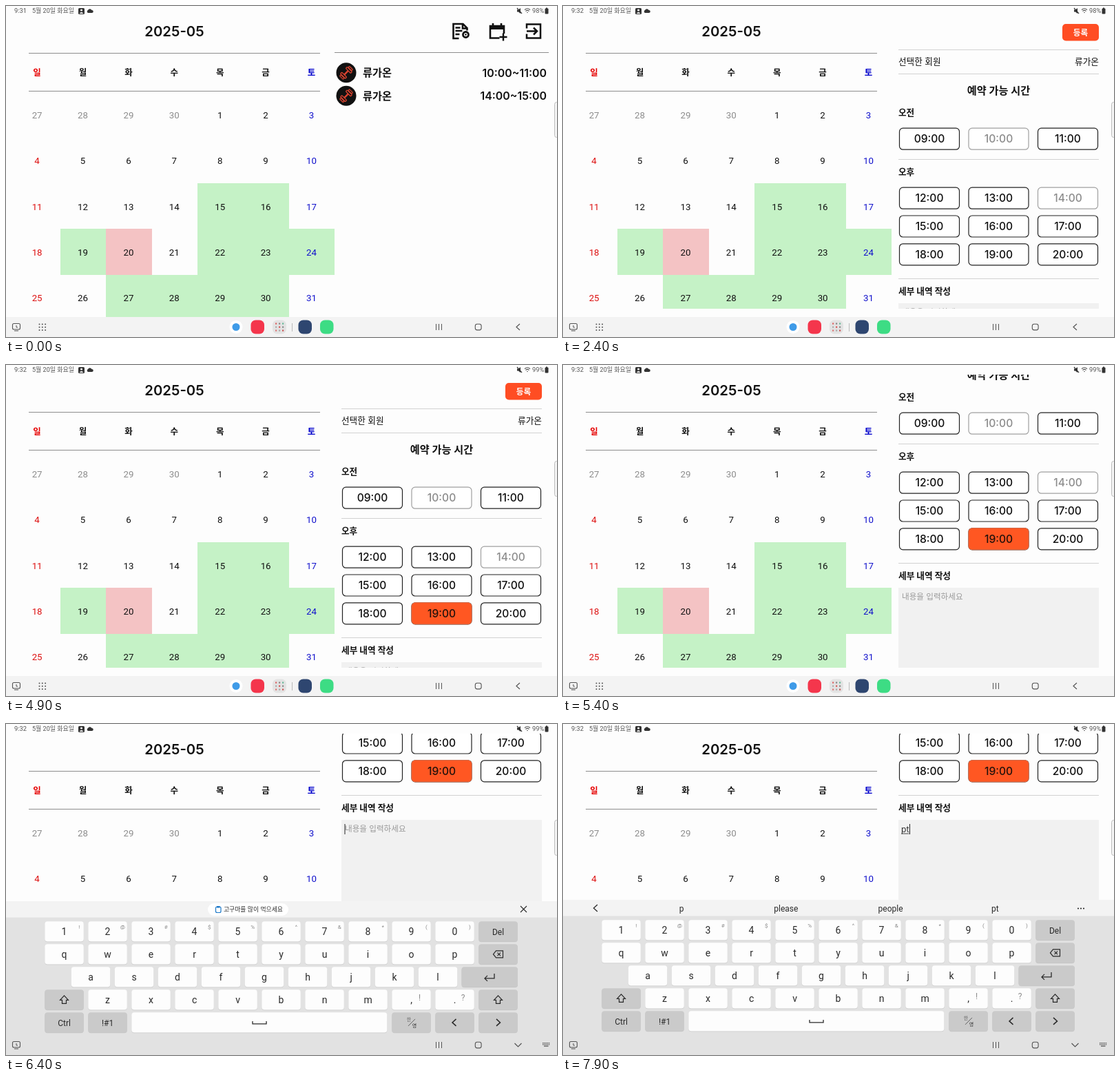
An HTML page with a canvas that plays this animation: 800x480 px, repeating every 8 s.

```html
<!DOCTYPE html>
<html lang="ko">
<head>
<meta charset="utf-8">
<title>Booking calendar</title>
<style>
html, body { margin: 0; width: 100%; height: 100%; overflow: hidden; background: #fdfdfd; }
canvas { display: block; width: 800px; height: 480px; }
</style>
</head>
<body>
<canvas id="stage" width="800" height="480"></canvas>
<script>
const ctx = document.getElementById('stage').getContext('2d');
const LOOP = 8000, STEP = 100;
const SANS = 'Inter, "Noto Sans CJK KR", "Noto Sans CJK JP", sans-serif';
const ROBOTO = 'Roboto, "Noto Sans CJK KR", "Noto Sans CJK JP", sans-serif';
const MEMBER = '류가온', OTHER = '문다솔';
const INK = '#111', ORANGE = '#ff5722', PAGE = '#fdfdfd';
const BOOKED = [15, 16, 19, 22, 23, 24, 27, 28, 29, 30];

const clamp = v => Math.max(0, Math.min(1, v));

// y is the vertical middle of the capitals
function text(s, x, y, size, { color = INK, weight = 400, align = 'left', font = SANS } = {}) {
  ctx.font = `${weight} ${size}px ${font}`;
  ctx.fillStyle = color;
  ctx.textAlign = align;
  ctx.fillText(s, x, y + size * 0.362);
}

function rect(x, y, w, h, color) {
  ctx.fillStyle = color;
  ctx.fillRect(x, y, w, h);
}

function box(x, y, w, h, r, fill, stroke, line = 1) {
  ctx.beginPath();
  ctx.roundRect(x, y, w, h, r);
  paint(fill, stroke, line);
}

function disc(x, y, r, fill, stroke, line = 1) {
  ctx.beginPath();
  ctx.arc(x, y, r, 0, Math.PI * 2);
  paint(fill, stroke, line);
}

function paint(fill, stroke, line) {
  if (fill) { ctx.fillStyle = fill; ctx.fill(); }
  if (stroke) { ctx.strokeStyle = stroke; ctx.lineWidth = line; ctx.stroke(); }
}

function path(d, x, y, color, line = 1, fill = false) {
  ctx.save();
  ctx.translate(x, y);
  const p = new Path2D(d);
  if (fill) {
    ctx.fillStyle = color;
    ctx.fill(p);
  } else {
    ctx.strokeStyle = color;
    ctx.lineWidth = line;
    ctx.stroke(p);
  }
  ctx.restore();
}

function clipped(x, y, w, h, draw) {
  ctx.save();
  ctx.beginPath();
  ctx.rect(x, y, w, h);
  ctx.clip();
  draw();
  ctx.restore();
}

function statusBar(t) {
  const gray = '#555';
  const style = { color: gray, font: ROBOTO };
  text(t < 2400 ? '9:31' : '9:32', 12, 7, 9.3, style);
  text('5월 20일 화요일', 38, 7, 9, style);
  box(105, 3, 9, 9, 1.5, '#333');
  disc(109.5, 6, 1.5, '#fff');
  path('M-3 3Q0-1 3 3Z', 109.5, 8, '#fff', 1, true);
  path('M-3 3A2.2 2.2 0 0 1-3-1A3 3 0 0 1 2.5-1A2 2 0 0 1 3 3Z', 122, 7, '#333', 1, true);
  path('M-3-1.5H-1L2-4V4L-1 1.5H-3Z', 745, 7, '#333', 1, true);
  path('M-3-4L4 4', 745, 7, '#333', 1.2);
  path('M-4-1.5Q0-5 4-1.5M-2.5.5Q0-1.7 2.5.5M-.8 2.5H.8', 757, 7, gray, 1.1);
  text(t < 4300 ? '98%' : '99%', 764, 7, 9.3, style);
  box(782.5, 3.5, 5, 8, 1, '#333');
  rect(784, 2.5, 2, 1.5, '#333');
}

function calendar(booked, bottom) {
  const CELL = 66.4;
  const edgeX = c => Math.round(12.3 + CELL * c);
  const edgeY = r => Math.round(124.2 + CELL * r);
  const midX = c => 45.1 + CELL * c;
  text('2025-05', 244.5, 37, 20.3, { weight: 600, align: 'center' });
  rect(33, 68, 423, 1, '#8d8d8d');
  rect(33, 123, 423, 1, '#8d8d8d');
  [...'일월화수목금토'].forEach((d, c) => {
    const color = c === 0 ? '#e60000' : c === 6 ? '#0000cc' : INK;
    text(d, midX(c), 96, 12.5, { color, weight: 700, align: 'center' });
  });
  clipped(0, 124, 478, bottom - 124, () => {
    for (let i = 0; i < 35; i++) {
      const c = i % 7, r = Math.floor(i / 7), day = i - 3;
      const x = edgeX(c), y = edgeY(r);
      const fill = day === 20 ? '#f4c3c4' : booked && BOOKED.includes(day) ? '#c5f2c6' : null;
      if (fill) rect(x, y, edgeX(c + 1) - x, edgeY(r + 1) - y, fill);
      const color = day < 1 ? '#8c8c8c' : c === 0 ? '#dd1111' : c === 6 ? '#1111cc' : INK;
      const label = day < 1 ? day + 30 : day;
      text(label, midX(c), 158 + CELL * r, 13.3, { color, align: 'center', font: ROBOTO });
    }
  });
}

function dumbbell(x, y) {
  disc(x, y, 14.5, '#111');
  ctx.save();
  ctx.translate(x, y);
  ctx.rotate(-Math.PI / 4);
  rect(-4, -1.2, 8, 2.4, '#d9432f');
  for (const s of [-1, 1]) {
    box(s * 5.5 - 1.5, -5, 3, 10, 1, null, '#d9432f', 1.3);
    box(s * 8.8 - 1.2, -3.5, 2.4, 7, 1, null, '#d9432f', 1.2);
  }
  ctx.restore();
}

function bookingList() {
  path('M-2 10.5H-10V-10.5H4L10-4.5V-1M3.5-10.5V-4H10M-7-5H0M-7-.5H3M-7 4.5H-1', 659.5, 36.5, INK, 2.6);
  disc(667.5, 41.5, 4, null, INK, 2.8);
  disc(667.5, 41.5, 1.3, INK);
  path('M4 9.5H-9.5V-8H10.5V3M-5.5-12V-7M6.5-12V-7', 712.5, 37, INK, 2.6);
  rect(702, 28, 22, 6, INK);
  path('M-5.5 0H5.5M0-5.5V5.5', 722, 45, INK, 2.4);
  path('M-10-4V-10H10V10H-10V4M-10 0H4M0-5L5 0L0 5', 766, 36.5, INK, 2.5);
  rect(477, 67, 311, 1, '#8d8d8d');
  ['10:00~11:00', '14:00~15:00'].forEach((hours, i) => {
    const y = 96.8 + 33.4 * i;
    dumbbell(494, y);
    text(MEMBER, 518, y, 15.2, { weight: 600 });
    text(hours, 785, y, 15.9, { weight: 600, align: 'right' });
  });
}

function slot(label, x, y, taken, pick) {
  const style = { weight: 500, align: 'center' };
  const color = taken ? '#8c8c8c' : INK;
  box(x, y - 15.5, 87, 31, 5, '#fff', taken ? '#a0a0a0' : '#222', 1.2);
  text(label, x + 43.5, y, 15.6, { ...style, color });
  if (!pick) return;
  ctx.globalAlpha = pick;
  box(x, y - 15.5, 87, 31, 5, ORANGE, '#f0693f');
  text(label, x + 43.5, y, 15.6, { ...style, color: '#24120c' });
  ctx.globalAlpha = 1;
}

function bookingForm(t, loaded, scroll) {
  const bold = { weight: 700 };
  const rule = y => rect(487, y, 291, 1, '#d2d2d2');
  ctx.translate(0, -scroll);
  box(725, 26, 53, 24.5, 5, '#ff4d23');
  text('등록', 751.5, 38.5, 11.6, { color: '#fff', weight: 700, align: 'center' });
  rule(63);
  text('선택한 회원', 487, 80.5, 12.6);
  text(loaded ? MEMBER : OTHER, 778, 80.5, 12.7, { align: 'right' });
  rule(98);
  text('예약 가능 시간', 632.5, 122.5, 15.2, { weight: 600, align: 'center' });
  text('오전', 487, 154.5, 12.6, bold);
  rule(222);
  text('오후', 487, 240.5, 12.6, bold);
  for (let i = 0; i < 12; i++) {
    const hour = 9 + i, r = Math.floor(i / 3);
    const y = r ? 237.9 + 40.8 * r : 192.7;
    const taken = loaded && (hour === 10 || hour === 14);
    const pick = hour === 19 ? clamp((t - 3700) / 400) : 0;
    slot(String(hour).padStart(2, '0') + ':00', 488.5 + 100.5 * (i % 3), y, taken, pick);
  }
  rule(395);
  text('세부 내역 작성', 487, 413, 12.7, bold);
  rect(487, 431, 291, 120, '#f1f1f1');
  const typed = t < 7000 ? '' : t < 7700 ? 'p' : 'pt';
  let caret = 491.5;
  if (typed) {
    text(typed, 491, 444.5, 12.2, { color: '#333' });
    const w = ctx.measureText(typed).width;
    rect(491, 450.5, w, 1, '#444');
    caret = 491.5 + w;
  } else {
    text('내용을 입력하세요', 492, 444.2, 11.6, { color: '#999' });
  }
  if (t >= 6100) rect(caret, 437, 1, 15, '#222');
}

function keyboard(t, off) {
  const gray = '#cacaca', dark = '#2a2a2a';
  const center = { color: dark, align: 'center', font: ROBOTO };
  ctx.save();
  ctx.translate(0, off);
  rect(0, 255, 800, 225, '#e2e2e2');
  rect(0, 255, 800, 23.5, '#f3f3f3');
  if (t < 7000) {
    box(293, 258, 117, 18, 9, '#fff');
    box(304.5, 263, 7.5, 8.5, 2, '#fff', '#1c78c8', 1.2);
    rect(306, 262, 4.5, 2.5, '#1c78c8');
    text('고구마를 많이 먹으세요', 316, 267, 8.8, { color: dark });
    path('M-4.5-4.5L4.5 4.5M4.5-4.5L-4.5 4.5', 751.5, 266.5, dark, 1.1);
  } else {
    ctx.globalAlpha = t < 7100 ? 0.6 : 1;
    path('M3-5L-2.5 0L3 5', 47, 267, dark, 1.3);
    ['p', 'please', 'people', 'pt'].forEach((w, i) => text(w, 172 + 151.8 * i, 267.5, 12, center));
    for (const x of [748, 752, 756]) disc(x, 267.5, 1.1, dark);
    ctx.globalAlpha = 1;
  }

  const rowY = r => 284.2 + 33 * r;
  const mid = r => rowY(r) + 14.7;
  function key(x, r, label = '', w = 56.5, fill = '#fdfdfd', size = 14) {
    box(x, rowY(r) + 0.8, w, 29.2, 4, '#c6c6c6');
    box(x, rowY(r), w, 29.2, 4, fill);
    text(label, x + w / 2, mid(r) + 0.5, size, center);
  }
  const hint = (s, x, y, size) => text(s, x, y, size, { ...center, color: '#8a8a8a' });
  const col = i => 56.3 + 63 * i;

  [...'1234567890'].forEach((k, i) => {
    key(col(i), 0, k);
    hint('!@#$%^&*()'[i], col(i) + 50, 292, 8);
  });
  [...'qwertyuiop'].forEach((k, i) =>
    key(col(i), 1, k, 56.5, k === 'p' && t === 7000 ? '#d5d5d5' : undefined));
  [...'asdfghjkl'].forEach((k, i) => key(col(i) + 38.5, 2, k));
  [...'zxcvbnm,.'].forEach((k, i) => key(col(i + 1), 3, k));
  hint('!', 600.5, 394.5, 12);
  hint('?', 663.5, 394.5, 12);
  key(col(10), 0, 'Del', 56.5, gray, 12);
  key(col(10), 1, '', 56.5, gray);
  key(661.5, 2, '', 81.5, gray);
  key(col(0), 3, '', 56.5, gray);
  key(col(10), 3, '', 56.5, gray);
  key(col(0), 4, 'Ctrl', 56.5, gray, 12);
  key(col(1), 4, '!#1', 56.5, gray, 12);
  key(col(2), 4, '', 371);
  for (const i of [8, 9, 10]) key(col(i), 4, '', 56.5, gray);

  path('M-7 0L-3-5H7V5H-3ZM-1-2.3L3.5 2.3M3.5-2.3L-1 2.3', 714.5, mid(1), dark, 1.2);
  path('M7-5V2H-7M-3-2L-7 2L-3 6', 702, mid(2), dark, 1.3);
  for (const x of [84.5, 714.5])
    path('M0-6L6 .5H3V5.5H-3V.5H-6Z', x, mid(3), dark, 1.2);
  path('M-10-2V2H10V-2', 368, mid(4), dark, 1.3);
  text('한', 585, mid(4) - 4, 7, { ...center, color: '#666' });
  text('영', 593, mid(4) + 5, 7, center);
  path('M5-5L-5 5', 589, mid(4), '#555', 0.9);
  path('M2.5-5L-3 0L2.5 5', 651, mid(4), dark, 1.5);
  path('M-2.5-5L3 0L-2.5 5', 714.5, mid(4), dark, 1.5);
  ctx.restore();
}

function dock() {
  for (let i = 0; i < 9; i++) disc(48.5 + 4.3 * (i % 3), 461.5 + 4.3 * Math.floor(i / 3), 1, '#555');
  disc(334, 465.5, 9.5, '#fff');
  disc(334, 465.5, 5.5, '#3f9be8');
  box(355.5, 455.5, 19.5, 20, 7, '#f4364c');
  box(387, 455.5, 20, 20, 7, '#e3e3e3');
  const dots = ['#d66', '#888', '#6b9', '#aaa', '#d55', '#888', '#d77', '#aaa', '#c55'];
  dots.forEach((c, i) => rect(391 + 5 * (i % 3), 459.5 + 5 * Math.floor(i / 3), 2.2, 2.2, c));
  rect(415, 460, 1, 12, '#bbb');
  box(424.5, 455.5, 19.5, 20, 7, '#2e4670');
  box(456, 455.5, 19.5, 20, 7, '#3ddc84');
}

function navBar(typing) {
  const gray = '#555';
  if (!typing) {
    rect(0, 451, 800, 29, '#f3f3f3');
    dock();
  }
  box(9.5, 460.5, 11, 8.5, 2, null, gray, 1.1);
  path('M-3 6H3M0-2V1H2', 15, 465, gray, 1);
  for (const x of [624.5, 628.5, 632.5]) rect(x - 0.5, 461, 1, 9, gray);
  box(681.3, 461.3, 8.8, 8.6, 2.8, null, gray, 1.1);
  if (typing) {
    path('M-5-2.5L0 2.5L5-2.5', 743.5, 465.5, gray, 1.2);
    for (let i = 0; i < 10; i++) rect(779 + 2.2 * (i % 5), 462 + 2.2 * Math.floor(i / 5), 1.4, 1.3, gray);
    rect(781, 466.5, 6.5, 1.2, gray);
  } else {
    path('M2.5-4.5L-2.5 0L2.5 4.5', 743.5, 465.5, gray, 1.2);
  }
}

function draw(t) {
  const form = t >= 1300, loaded = t >= 1400, typing = t >= 6100;
  const drag = Math.sin(clamp((t - 5100) / 300) * Math.PI / 2) ** 1.3;
  const scroll = 108 * drag + 184 * clamp((t - 6200) / 200);
  const bottom = form ? 439 : 451;

  rect(0, 0, 800, 480, PAGE);
  calendar(!form || loaded, bottom);
  if (form) clipped(480, 14, 310, bottom - 14, () => bookingForm(t, loaded, scroll));
  else bookingList();
  statusBar(t);
  box(796.5, 139.5, 8, 51, 3, '#f4f4f4', '#bdbdbd');
  if (typing) keyboard(t, 225 * (1 - clamp((t - 6000) / 600)) ** 4.3);
  navBar(typing);
}

const start = performance.now();
function frame() {
  const t = (performance.now() - start) % LOOP;
  draw(Math.floor(t / STEP) * STEP);
  requestAnimationFrame(frame);
}
frame();
</script>
</body>
</html>
```
